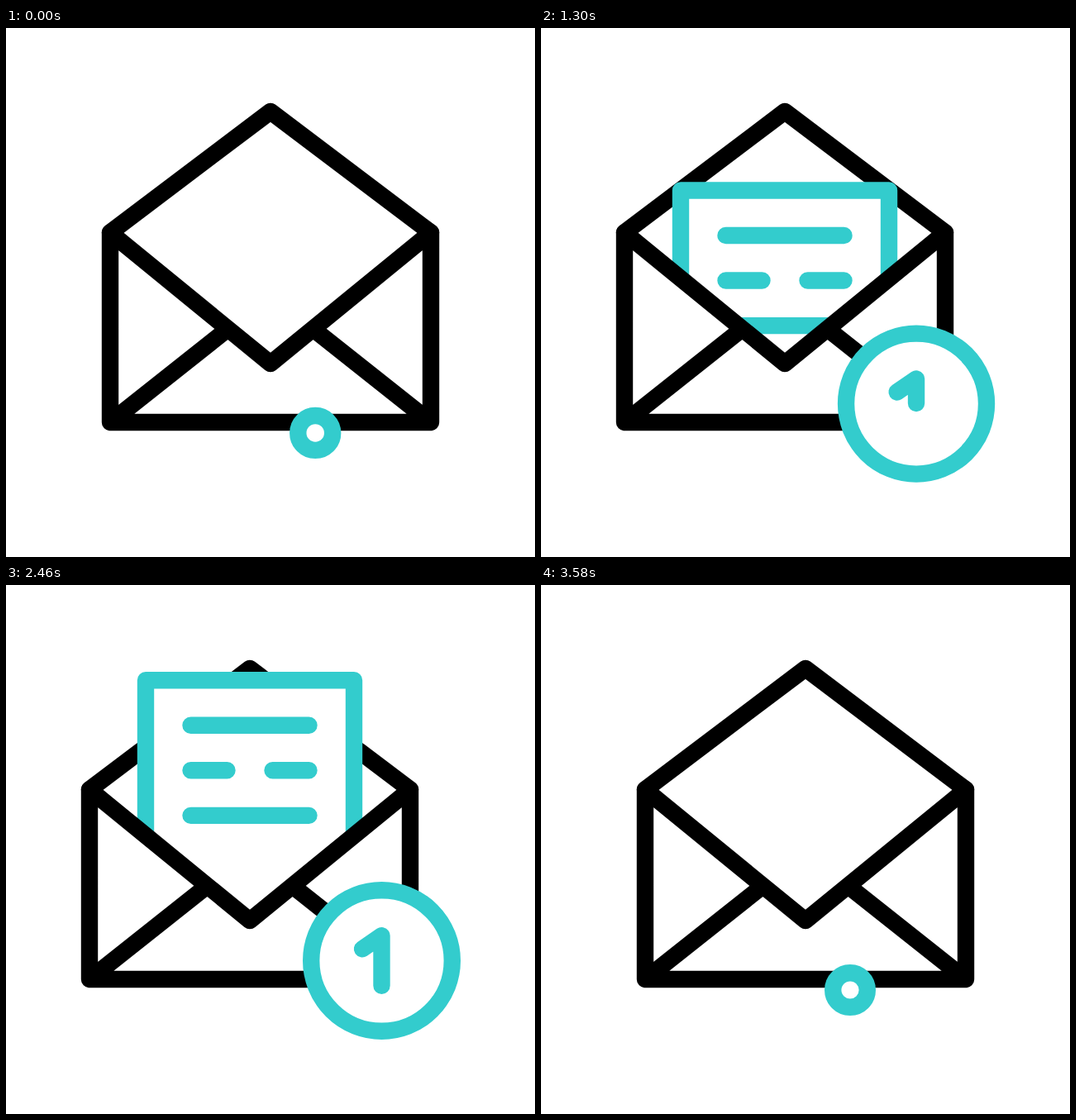
An HTML page that plays this animation: 640x640 px, repeating every 3.6 s.

```html
<!DOCTYPE html>
<html lang="en">
<head>
<meta charset="utf-8">
<title>New mail</title>
<style>
  html, body { margin: 0; width: 100%; height: 100%; overflow: hidden; background: #fff; }
  svg { display: block; width: 100vw; height: 100vh; }
  .line { fill: none; stroke-width: 20.4; stroke-linecap: round; stroke-linejoin: round; }
  .dark { stroke: #000; }
  .teal { stroke: #33cccd; }
  .white { fill: #fff; }
</style>
</head>
<body>
<svg viewBox="0 0 640 640">
  <defs>
    <clipPath id="pocket"><path d="M-194 0V247.5L0 406L194 247.5V0Z"/></clipPath>
  </defs>
  <g id="envelope">
    <path class="line dark" d="M-194 247.5L0 101L194 247.5"/>
    <g clip-path="url(#pocket)">
      <g id="paper">
        <rect class="line teal white" x="-126" y="0" width="252" height="420"/>
        <path class="line teal" d="M-71.5 54.5H71.5M-71.5 109H-27.5M27.5 109H71.5M-71.5 163.6H71.5"/>
      </g>
    </g>
    <path class="line dark" d="M-194 247.5V477H194V247.5L0 406ZM-194 477L-51.5 364M194 477L51.5 364"/>
  </g>
  <circle id="ring" class="line teal white"/>
  <polyline id="digit" class="line teal" pathLength="1"/>
</svg>
<script>
  const LOOP = 3600;
  const BACK = 2200;
  const RADIUS = 85.3;
  const ONE = [[-23.5, -14.2], [0, -30.3], [0, 30.3]];

  // Start and end of each part's way in and way out, in ms
  const TIMES = {
    envelope: [0, 1333, 2650, 3580],
    paper: [717, 1717, 2450, 3232],
    digit: [540, 1980, 2500, 3474]
  };

  const [envelope, paper, ring, digit] =
    ['envelope', 'paper', 'ring', 'digit'].map(id => document.getElementById(id));

  const clamp = v => Math.min(1, Math.max(0, v));
  const bezier = (a, b, s) => 3 * (1 - s) * s * ((1 - s) * a + s * b) + s ** 3;

  function ease(u) {
    if (u <= 0 || u >= 1) return clamp(u);
    let lo = 0, hi = 1;
    for (let i = 0; i < 24; i++) {
      const mid = (lo + hi) / 2;
      if (bezier(0.55, 0.35, mid) < u) lo = mid; else hi = mid;
    }
    return bezier(0, 1, lo);
  }

  function progress(t, [inStart, inEnd, outStart, outEnd]) {
    return t < BACK
      ? ease((t - inStart) / (inEnd - inStart))
      : 1 - ease((t - outStart) / (outEnd - outStart));
  }

  // The badge pops out fast, settles slowly, and shrinks away late
  function growth(t) {
    return t < BACK
      ? 1 - clamp(1 - t / 1980) ** 4.9
      : 1 - clamp((t - BACK) / 1380) ** 6.6;
  }

  function draw(t) {
    const shift = progress(t, TIMES.envelope);
    const rise = progress(t, TIMES.paper);
    const drawn = progress(t, TIMES.digit);
    const grow = growth(t);

    envelope.setAttribute('transform', `translate(${320 - 25 * shift} 0)`);
    paper.setAttribute('transform', `translate(0 ${450.2 - 335 * rise})`);

    const x = 374 + 88.7 * grow - 8.2 * shift;
    const y = 490 - 22.3 * grow - 13.2 * shift;
    const r = 20.8 + (RADIUS - 20.8) * grow;
    ring.setAttribute('cx', x);
    ring.setAttribute('cy', y);
    ring.setAttribute('r', r);

    const k = r / RADIUS;
    digit.setAttribute('points', ONE.map(([dx, dy]) => `${x + dx * k},${y + dy * k}`).join(' '));
    digit.setAttribute('stroke-dasharray', drawn < 1 ? `${drawn} 2` : 'none');
    digit.setAttribute('visibility', drawn > 0 ? 'visible' : 'hidden');
  }

  const start = performance.now();
  function tick() {
    draw((performance.now() - start) % LOOP);
    requestAnimationFrame(tick);
  }
  draw(0);
  requestAnimationFrame(tick);
</script>
</body>
</html>
```
